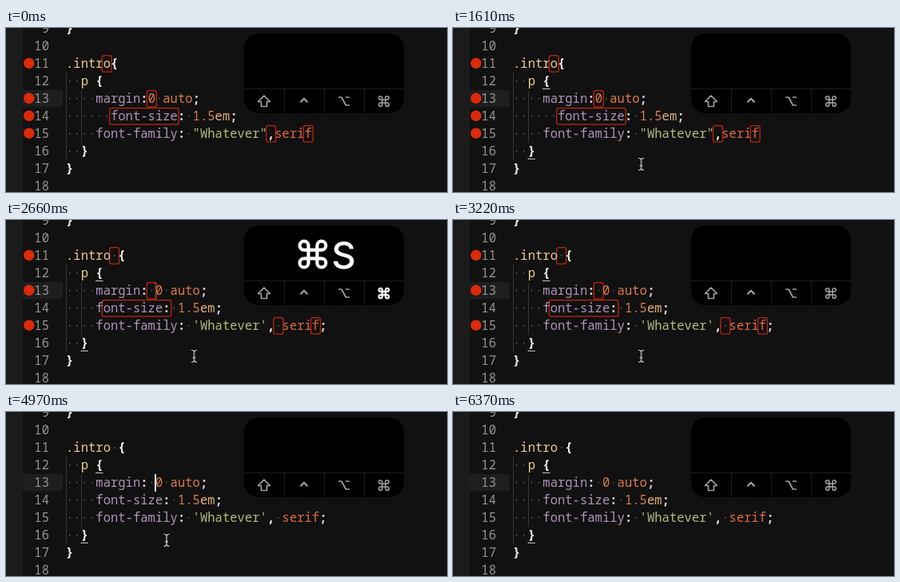
These frames come from a looping animation (552 px wide and 206 px high, 6720 ms). An HTML page:

```html
<!DOCTYPE html>
<html lang="en">
<head>
<meta charset="utf-8">
<title>Format on save</title>
<style>
html, body { margin: 0; width: 100%; height: 100%; overflow: hidden; background: #111; }
svg { display: block; width: 552px; height: 206px; }
text { font: 15.55px "Noto Sans Mono", monospace; white-space: pre; }
.num { fill: #959595; }
.strong { font-weight: 600; }
.mark { fill: none; stroke: #bd2411; stroke-width: 1.3; }
.dot { fill: #dc2a0b; }
.space { fill: #5c5c5c; }
.guide { stroke: #363636; }
.icon { fill: none; stroke: #a0a0a0; stroke-width: 1.7; stroke-linejoin: round; }
.split { stroke: #1d1d1d; }
#big text { font: 500 47px Inter, sans-serif; fill: #fff; }
#old, #new, #lint, #match, #big, #held, #caret, #mouse { animation: 6720ms linear infinite; }
#old { animation-name: old; animation-timing-function: step-end; }
#new { animation-name: new; animation-timing-function: step-end; }
#lint { animation-name: lint; animation-timing-function: step-end; }
#match { animation-name: match; animation-timing-function: step-end; }
#big { animation-name: big; }
#held { animation-name: held; }
#caret { animation-name: caret; animation-timing-function: ease-in-out; }
#mouse { animation-name: mouse; animation-timing-function: ease-in-out; }
@keyframes old { 0% { opacity: 1 } 38.54%, 100% { opacity: 0 } }
@keyframes new { 0% { opacity: 0 } 38.54%, 100% { opacity: 1 } }
@keyframes lint { 0% { opacity: 1 } 69.8%, 100% { opacity: 0 } }
@keyframes match { 0% { opacity: 0 } 1.04%, 100% { opacity: 1 } }
@keyframes big { 0%, 34.36% { opacity: 0 } 34.37%, 42.5% { opacity: 1 } 46.8%, 100% { opacity: 0 } }
@keyframes held { 0%, 27% { opacity: 0 } 29%, 42.5% { opacity: 1 } 46.8%, 100% { opacity: 0 } }
@keyframes caret {
  0%, 9.08%, 18.01%, 23.96%, 32.89%, 38.84%, 47.77%, 53.72%,
  62.65%, 68.6%, 77.53%, 83.48%, 92.41%, 100% { opacity: 0 }
  12.05%, 15.03%, 26.93%, 29.91%, 41.82%, 44.79%,
  56.7%, 59.67%, 71.58%, 74.55%, 86.46%, 89.43% { opacity: 1 }
}
@keyframes mouse {
  0%, 1% { transform: translate(250px, 218px) }
  10.4% { transform: translate(246px, 177px) }
  11.46%, 65.6% { transform: translate(235.5px, 171px) }
  73.9%, 76% { transform: translate(201px, 161px) }
  84.5%, 100% { transform: translate(248px, 218px) }
}
</style>
</head>
<body>
<svg viewBox="0 0 552 206">
  <defs>
    <path id="cmd" d="M3-6V6a3 3 0 1 0 3-3H-6a3 3 0 1 0 3 3V-6a3 3 0 1 0-3 3H6a3 3 0 1 0-3-3"/>
    <path id="beam" d="M-3.5-7.5Q0-7.5 0-5Q0-7.5 3.5-7.5M0-5V5M-3.5 7.5Q0 7.5 0 5Q0 7.5 3.5 7.5M-2 2H2"/>
  </defs>
  <rect width="552" height="206" fill="#111"/>
  <rect width="21" height="206" fill="#1b1b1b"/>
  <rect x="21" y="78" width="50" height="21.5" fill="#1e1e1e"/>
  <path class="guide" d="M75.5 56V166M94.5 78V144"/>
  <g id="base"></g>
  <g id="old"></g>
  <g id="new"><g id="lint"></g></g>
  <path id="match" d="M112 76.5h9.5M93.5 164.5h9.5" stroke="#ccc"/>
  <rect id="caret" x="186" y="78" width="2" height="22" fill="#e6e6e6"/>

  <rect x="298" y="7" width="200" height="100" rx="18"/>
  <path class="split" d="M298 76.5H498M348.5 77V107M398.5 77V107M448.5 77V107"/>
  <g class="icon">
    <path transform="translate(323 92)" d="M0-7L7.5 .5H3.5V6.5H-3.5V.5H-7.5Z"/>
    <path transform="translate(373 91)" d="M-4.5 2.2L0-2.2L4.5 2.2" stroke-width="2.3"/>
    <path transform="translate(423 92)" d="M-7-5h4L2.5 5H7M2-5h5"/>
    <use href="#cmd" transform="translate(473 92) scale(.7)" stroke-width="2.2"/>
    <use id="held" href="#cmd" transform="translate(473 92) scale(.7)" stroke="#fff" stroke-width="2.8"/>
  </g>
  <g id="big">
    <use href="#cmd" transform="translate(384 43) scale(1.82)" fill="none" stroke="#fff" stroke-width="2.3"/>
    <text x="407.5" y="60.5">S</text>
  </g>

  <g id="mouse" fill="none">
    <use href="#beam" stroke="#000" stroke-width="2.8"/>
    <use href="#beam" stroke="#e8e8e8" stroke-width="1.2"/>
  </g>
</svg>
<script>
const CELL = 9.33, LEFT = 75, ROW = 22;
const COLORS = { y: '#ecce8e', w: '#f6f6f6', p: '#b294bb', c: '#dcd9dc', o: '#e07a4a', r: '#e2683f', e: '#e3b27a', g: '#b5bd78' };
const byId = id => document.getElementById(id);
const colX = col => LEFT + col * CELL;
const rowY = n => 44.6 + (n - 11) * ROW;

function add(parent, tag, attrs, text = '') {
  const el = document.createElementNS('http://www.w3.org/2000/svg', tag);
  for (const k in attrs) el.setAttribute(k, attrs[k]);
  el.textContent = text;
  parent.append(el);
}

// Each token is a colour key followed by its text; plain spaces get a dot.
function code(parent, n, ...tokens) {
  let col = 0;
  for (const [key, ...chars] of tokens) {
    const text = chars.join('').replace(/ /g, '\u00a0');
    const weight = 'wc'.includes(key) ? 'strong' : '';
    add(parent, 'text', { class: weight, x: colX(col), y: rowY(n) + 5.4, fill: COLORS[key] }, text);
    chars.forEach((ch, i) => {
      if (ch === ' ') add(parent, 'circle', { class: 'space', cx: colX(col + i + .5), cy: rowY(n), r: .95 });
    });
    col += chars.length;
  }
}

function mark(parent, n, col, len = 1) {
  add(parent, 'rect', { class: 'mark', x: colX(col) - 1.3, y: rowY(n) - 10, width: len * CELL + 2.6, height: 20.6, rx: 2.5 });
}

function dots(parent, rows) {
  for (const n of rows) add(parent, 'circle', { class: 'dot', cx: 28.8, cy: rowY(n) - .3, r: 6.7 });
}

const base = byId('base'), before = byId('old'), after = byId('new'), lint = byId('lint');

for (let n = 9; n <= 18; n++) {
  add(base, 'text', { class: 'num', x: 54, y: rowY(n) + 5.4, 'text-anchor': 'end' }, n);
}
code(base, 9, 'w}');
code(base, 12, 'w  ', 'yp', 'w\u00a0{');
code(base, 16, 'w  ', 'w}');
code(base, 17, 'w}');

code(before, 11, 'y.intro', 'w{');
code(before, 13, 'w    ', 'pmargin', 'c:', 'o0', 'w ', 'oauto', 'c;');
code(before, 14, 'w      ', 'pfont-size', 'c: ', 'o1.5', 'eem', 'c;');
code(before, 15, 'w    ', 'pfont-family', 'c: ', 'g"Whatever"', 'w,', 'rserif');
dots(before, [11, 13, 14, 15]);
mark(before, 11, 5);
mark(before, 13, 11);
mark(before, 14, 6, 9);
mark(before, 15, 27);
mark(before, 15, 32);

code(after, 11, 'y.intro', 'w {');
code(after, 13, 'w    ', 'pmargin', 'c: ', 'o0', 'w ', 'oauto', 'c;');
code(after, 14, 'w    ', 'pfont-size', 'c: ', 'o1.5', 'eem', 'c;');
code(after, 15, 'w    ', 'pfont-family', 'c: ', "g'Whatever'", 'w, ', 'rserif', 'c;');
dots(lint, [11, 13, 15]);
mark(lint, 11, 6);
mark(lint, 13, 11);
mark(lint, 14, 5, 9);
mark(lint, 15, 28);
mark(lint, 15, 33);
</script>
</body>
</html>
```
